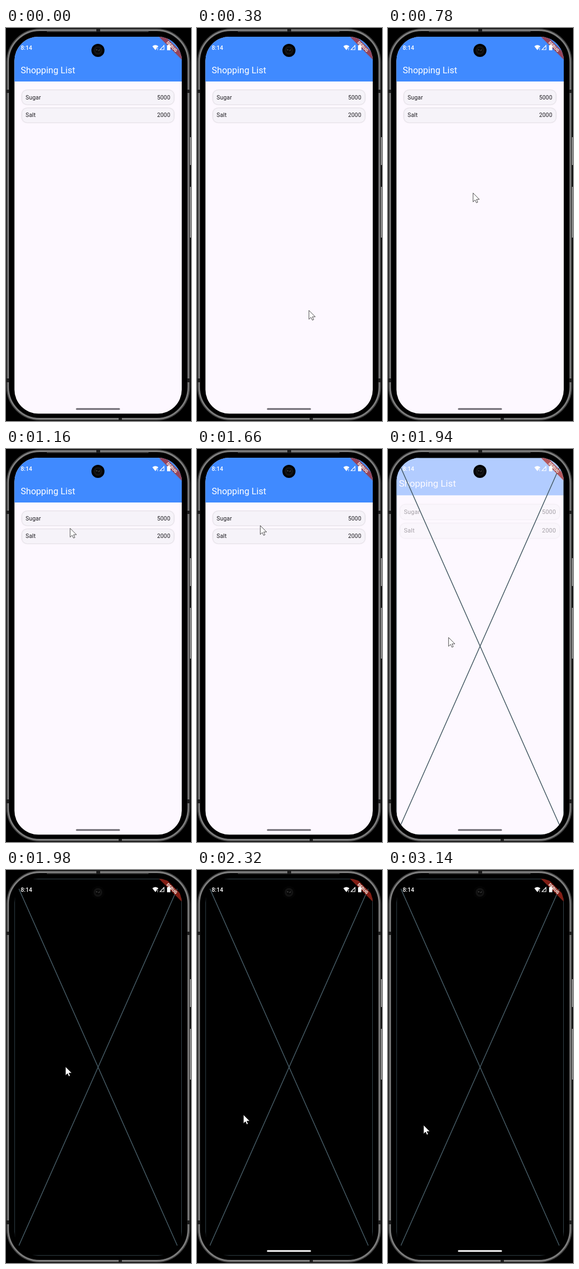
An HTML page that plays this animation: 340 by 720 pixels, repeating every 3160 ms.

```html
<!DOCTYPE html>
<html lang="en">
<head>
<meta charset="utf-8">
<title>Shopping List</title>
<style>
  html, body { margin: 0; width: 100%; height: 100%; overflow: hidden; background: #000; }
  svg { display: block; width: 100vw; height: 100vh; font-family: Roboto, sans-serif; }
  .item { font-size: 10.5px; letter-spacing: .19px; fill: #1d1b20; }
  .card { fill: #f6f3f9; filter: drop-shadow(0 .8px .8px rgba(0, 0, 0, .28)); }
</style>
</head>
<body>
<svg viewBox="0 0 340 720">
  <defs>
    <clipPath id="screen"><rect x="15.5" y="16" width="307.5" height="690.5" rx="44"/></clipPath>
  </defs>
  <rect width="340" height="720"/>

  <!-- Phone body -->
  <g fill="none">
    <rect x="3.2" y="3.5" width="332.6" height="713" rx="59" stroke="#484848" stroke-width="5"/>
    <rect x="4" y="4" width="331" height="712" rx="58" stroke="#8c8c8c" stroke-width="1.8"/>
  </g>
  <path d="M75 6.5H262" stroke="#4a4a4a" stroke-width="1.5"/>
  <path d="M0 113h6v6h-6zM0 642h6v7h-6zM333 113h6v6h-6zM333 642h6v7h-6zM166 0h7v7h-7zM207 714h6v6h-6z" fill="#1c1c1c"/>
  <path d="M339 200V251M339 291V384" stroke="#8c8c8c" stroke-width="2"/>

  <g clip-path="url(#screen)">
    <g id="list">
      <rect x="15" y="16" width="308.5" height="691" fill="#fdf8ff"/>
      <rect x="15" y="16" width="308.5" height="82" fill="#408aff"/>
      <text x="27" y="82.5" font-size="16.5" fill="#fff">Shopping List</text>
      <rect class="card" x="29.5" y="114" width="279" height="26" rx="9"/>
      <rect class="card" x="29.5" y="147" width="279" height="26" rx="9"/>
      <g class="item">
        <text x="36" y="130.5">Sugar</text>
        <text x="302" y="130.5" text-anchor="end">5000</text>
        <text x="36" y="163.3">Salt</text>
        <text x="302" y="163.3" text-anchor="end">2000</text>
      </g>
      <rect id="scrim" x="15" y="16" width="308.5" height="691" fill="#fdf8ff"/>
    </g>
    <g id="cross" fill="none" stroke="#455a64" stroke-width="1.5">
      <path d="M15.5 16H323V706.5H15.5ZL323 706.5M323 16L15.5 706.5"/>
    </g>
    <path d="M281 16H293.3L323 45.7V58Z" fill="#b42a1e" fill-opacity=".72"/>
    <text transform="translate(305 34) rotate(45)" y="2.7" text-anchor="middle" font-size="7.6" font-weight="900" fill="#f6eee8">DEBUG</text>
  </g>

  <!-- Status bar -->
  <g fill="#fff">
    <text x="27" y="39.8" font-size="10.7" font-weight="500">8:14</text>
    <path d="M269 33.5Q274.5 28.8 280 33.5L278.5 35.5H277V37.5L274.5 40.5Z"/>
    <path d="M278 36.5h1.2v2h-1.2zM278 39.2h1.2v1.2h-1.2z"/>
    <path d="M283 39.8H290.4V32Z" fill="none" stroke="#fff" stroke-width="1.1"/>
    <path d="M296 31.5h1.8v-1.3h2.4v1.3h1.8v9.3h-6z"/>
  </g>

  <!-- Camera -->
  <g transform="translate(169 41)">
    <circle r="12" fill="#030303"/>
    <circle r="8" fill="#131313"/>
    <circle r="4.5" fill="#080808"/>
    <path d="M-3.5 -1.5L-1 -.5M1 1L3 -1.5" stroke="#444" stroke-width="1.4"/>
  </g>

  <rect id="handle" x="128.5" y="696.5" width="81" height="3" rx="1.5"/>
  <path id="cursor" d="M.3 .3V16.5L4 13L6.5 18.2L9 17.1L6.6 12H11.9Z" fill="#fff" stroke="#000" stroke-width=".7"/>
</svg>

<script>
const LOOP = 3160, STEP = 40, PUSH_START = 1670, PUSH_MS = 300;
const CENTER = [169.25, 361.25];

// Pointer path: time, x, y
const pointer = [
  [240, 250, 722], [460, 180, 400], [680, 180, 400], [780, 156, 302],
  [900, 132, 215], [1020, 121, 163], [1160, 117, 142], [1220, 116, 140],
  [1660, 116, 140], [1740, 115, 185], [1820, 114, 250], [1900, 112, 322],
  [1940, 111, 345], [1980, 109, 360], [2060, 103, 391], [2180, 91, 432],
  [2300, 85, 448], [2940, 85, 448], [3140, 65, 467], [LOOP, 65, 467]
];

const el = id => document.getElementById(id);
const [list, scrim, cross, handle, cursor] = ["list", "scrim", "cross", "handle", "cursor"].map(el);
const mix = (a, b, k) => a + (b - a) * k;
const ramp = (v, from, to) => Math.min(1, Math.max(0, (v - from) / (to - from)));
const show = (node, visible) => node.setAttribute("visibility", visible ? "visible" : "hidden");

// Slow start, then a long settling tail
const zoomCurve = p => p < .166
  ? .4 * (p / .166) ** 2
  : 1 - .6 * (1 - (p - .166) / .834) ** 4;

function zoom(node, scale) {
  const [x, y] = CENTER;
  node.setAttribute("transform", `translate(${x} ${y}) scale(${scale}) translate(${-x} ${-y})`);
}

function drawPointer(time) {
  const next = pointer.findIndex(key => key[0] > time);
  show(cursor, next > 0);
  if (next < 1) return;
  const [t0, x0, y0] = pointer[next - 1], [t1, x1, y1] = pointer[next];
  const k = ramp(time, t0, t1);
  cursor.setAttribute("transform", `translate(${mix(x0, x1, k)} ${mix(y0, y1, k)})`);
}

function draw(now) {
  const elapsed = now % LOOP;
  const time = Math.max(0, Math.floor((elapsed - STEP / 2) / STEP) * STEP + STEP / 2);
  const push = ramp(time, PUSH_START, PUSH_START + PUSH_MS);
  const eased = zoomCurve(push);

  show(list, push < 1);
  zoom(list, mix(1, 1.05, eased));
  scrim.setAttribute("opacity", .6 * ramp(push, .2075, .4175));
  zoom(cross, mix(.85, 1, eased));
  cross.setAttribute("opacity", ramp(push, .125, .25));

  const light = ramp(time, 2020, 2180);
  handle.setAttribute("fill", push < 1 ? "#6b6870" : "#fff");
  handle.setAttribute("opacity", push < 1 ? 1 : light);

  drawPointer(time);
  requestAnimationFrame(() => draw(performance.now() - start));
}

const start = performance.now();
draw(0);
</script>
</body>
</html>
```
